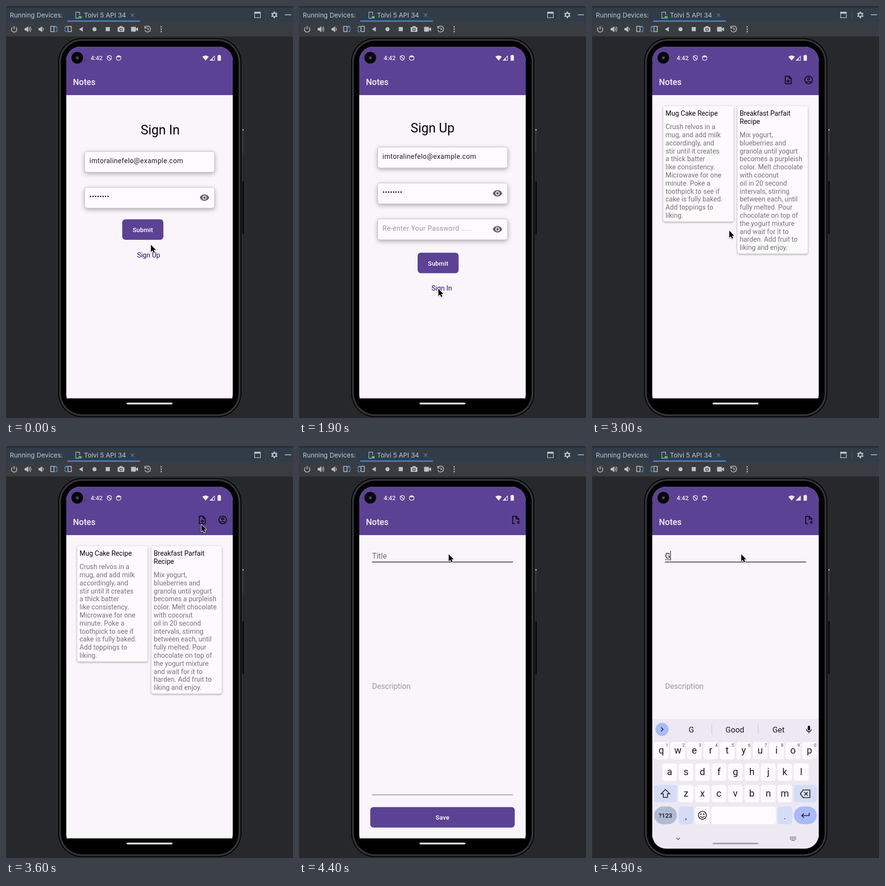
These frames come from a looping animation (600 px wide and 860 px high, 5000 ms). An HTML page with a canvas:

```html
<!DOCTYPE html>
<html lang="en">
<head>
<meta charset="utf-8">
<title>Notes app demo</title>
<style>
html, body { margin: 0; width: 100%; height: 100%; overflow: hidden; background: #27282b; }
canvas { display: block; width: 600px; height: 860px; }
</style>
</head>
<body>
<canvas id="stage"></canvas>
<script>
const LOOP = 5000, STEP = 100;
const canvas = document.getElementById('stage');
const dpr = window.devicePixelRatio || 1;
canvas.width = 600 * dpr;
canvas.height = 860 * dpr;
const ctx = canvas.getContext('2d');

const PURPLE = '#5b4295', PAGE = '#faf5fa', INK = '#1c1b1f', ICON = '#bfc1c4', BLUE = '#4a9bd8';
const SP = 0.8855;          // phone units to pixels
const BODY = 16 * SP, HEADING = 27;

// ---- helpers ----
function rect(x, y, w, h, color) {
  ctx.fillStyle = color;
  ctx.fillRect(x, y, w, h);
}

function box(x, y, w, h, r, fill, stroke) {
  ctx.beginPath();
  ctx.roundRect(x, y, w, h, r);
  if (fill) { ctx.fillStyle = fill; ctx.fill(); }
  if (stroke) { ctx.strokeStyle = stroke; ctx.lineWidth = 1; ctx.stroke(); }
}

function dot(x, y, r, color) {
  ctx.beginPath();
  ctx.arc(x, y, r, 0, Math.PI * 2);
  ctx.fillStyle = color;
  ctx.fill();
}

function ring(x, y, r, color, width) {
  ctx.beginPath();
  ctx.arc(x, y, r, 0, Math.PI * 2);
  ctx.strokeStyle = color;
  ctx.lineWidth = width;
  ctx.stroke();
}

function line(d, color, width) {
  ctx.strokeStyle = color;
  ctx.lineWidth = width;
  ctx.stroke(new Path2D(d));
}

function shape(d, color) {
  ctx.fillStyle = color;
  ctx.fill(new Path2D(d), 'evenodd');
}

// Icon on a 24-unit grid, centred on (x, y)
function icon(d, x, y, color, size = 24 * SP) {
  ctx.save();
  ctx.translate(x - size / 2, y - size / 2);
  ctx.scale(size / 24, size / 24);
  shape(d, color);
  ctx.restore();
}

function text(s, x, y, size, color, { weight = 400, align = 'left', gap = 0, face = 'Roboto' } = {}) {
  ctx.font = `${weight} ${size}px ${face}, sans-serif`;
  ctx.textAlign = align;
  ctx.letterSpacing = gap + 'px';
  ctx.fillStyle = color;
  ctx.fillText(s, x, y);
}

function withShadow(color, blur, dy, draw) {
  ctx.save();
  ctx.shadowColor = color;
  ctx.shadowBlur = blur * dpr;
  ctx.shadowOffsetY = dy * dpr;
  draw();
  ctx.restore();
}

const EYE = 'M12 4.5C7 4.5 2.73 7.61 1 12c1.73 4.39 6 7.5 11 7.5s9.27-3.11 11-7.5c-1.73-4.39-6-7.5-11-7.5zM12 17c-2.76 0-5-2.24-5-5s2.24-5 5-5 5 2.24 5 5-2.24 5-5 5zm0-8c-1.66 0-3 1.34-3 3s1.34 3 3 3 3-1.34 3-3-1.34-3-3-3z';
const NOTE_ADD = 'M13 11h-2v3H8v2h3v3h2v-3h3v-2h-3zm1-9H6c-1.1 0-2 .9-2 2v16c0 1.1.89 2 1.99 2H18c1.1 0 2-.9 2-2V8l-6-6zm4 18H6V4h7v5h5v11z';
const ACCOUNT = 'M12 2C6.48 2 2 6.48 2 12s4.48 10 10 10 10-4.48 10-10S17.52 2 12 2zM7.35 18.5C8.66 17.56 10.26 17 12 17s3.34.56 4.65 1.5C15.34 19.44 13.74 20 12 20s-3.34-.56-4.65-1.5zm10.79-1.38C16.45 15.8 14.32 15 12 15s-4.45.8-6.14 2.12C4.7 15.73 4 13.95 4 12c0-4.42 3.58-8 8-8s8 3.58 8 8c0 1.95-.7 3.73-1.86 5.12zM12 6c-1.93 0-3.5 1.57-3.5 3.5S10.07 13 12 13s3.5-1.57 3.5-3.5S13.93 6 12 6zm0 5c-.83 0-1.5-.67-1.5-1.5S11.17 8 12 8s1.5.67 1.5 1.5S12.83 11 12 11z';
const MIC = 'M12 14c1.66 0 3-1.34 3-3V5c0-1.66-1.34-3-3-3S9 3.34 9 5v6c0 1.66 1.34 3 3 3zM17 11c0 2.76-2.24 5-5 5s-5-2.24-5-5H5c0 3.53 2.61 6.43 6 6.92V21h2v-3.08c3.39-.49 6-3.39 6-6.92h-2z';

// ---- IDE window ----
function speaker(x) {
  shape(`M${x} 46h3l4.500-4v13l-4.500-4h-3z`, ICON);
  line(`M${x + 9} 45.500q2.500 3 0 6`, ICON, 1.4);
}

function rotateIcon(x, side) {
  ctx.save();
  ctx.translate(x, 48);
  ctx.scale(side, 1);
  line('M-6.500 -5.500h7v11h-7z', ICON, 1.6);
  line('M3 -5.500q5 .5 3.500 5.500M3 6q4 0 4 -5M5 -7l-2.500 1.700l2.500 2', BLUE, 1.5);
  ctx.restore();
}

function ide() {
  rect(0, 0, 600, 860, '#27282b');
  rect(0, 0, 600, 4, '#2b2d30');
  rect(0, 4, 600, 29, '#323c48');
  rect(0, 33, 600, 31, '#393d42');
  rect(0, 63, 600, 1, '#313335');
  rect(0, 33, 1, 827, '#303236');

  text('Running Devices:', 8, 23.5, 13.5, '#c3c8ce', { face: 'Inter' });
  text('Tolvi 5 API 34', 163, 23.5, 13.5, '#c3c8ce', { face: 'Inter' });
  rect(128, 30, 152, 3, '#3f7fc6');
  line('M152 25.500h-6v-12.500h8v6', '#aeb3b8', 1.3);
  rect(152, 21, 6, 5, '#5fb865');
  line('M261 15.500l7 7M268 15.500l-7 7', '#727a83', 1.1);

  line('M519.700 12.700h12v11.600h-12z', ICON, 1.3);
  rect(519, 12, 13, 4, ICON);
  rect(543, 8, 1, 21, '#46505b');
  ring(561, 18.5, 3.8, ICON, 2.4);
  for (let i = 0; i < 6; i++) {
    const a = i * Math.PI / 3 + Math.PI / 6, c = Math.cos(a), s = Math.sin(a);
    line(`M${561 + c * 4.5} ${18.5 + s * 4.5}L${561 + c * 6.8} ${18.5 + s * 6.8}`, ICON, 3);
  }
  rect(583, 17.5, 13, 1.6, ICON);

  line('M13.500 44.500a5.600 5.600 0 1 0 7 0M17 42v6.500', ICON, 1.6);
  speaker(39);
  line('M50 43q4.500 5.500 0 11', ICON, 1.4);
  speaker(68);
  rotateIcon(100, 1);
  rotateIcon(130, -1);
  shape('M152.500 48.500l8-5v10z', ICON);
  dot(185, 48.5, 4.3, ICON);
  rect(208.5, 44, 8.5, 8.5, ICON);
  box(233.5, 44, 14, 10, 1.5, ICON);
  rect(237.5, 42, 6, 3, ICON);
  ring(240.5, 49, 2.6, '#393d42', 1.4);
  box(261.5, 43.5, 10, 10, 1, ICON);
  shape('M271 48l5-4v9l-5-4z', ICON);
  line('M291 44.500a6.200 6.200 0 1 1 -.8 5.500M290 42v4h4M296.500 45v3.800h3', ICON, 1.5);
  for (const y of [43.5, 48.5, 53.5]) dot(324.5, y, 1.5, ICON);
}

// ---- phone shell ----
function shell() {
  box(493, 258, 3.5, 49, 1, '#38393b');
  rect(494.5, 257, 2, 3, '#d8d8d8');
  box(493, 366, 4, 110, 1, '#050506');
  const layers = [[0, '#343537'], [1.2, '#0c0c0e'], [4, '#29292c'], [5.2, '#424346'], [6.6, '#232325'], [8, '#000']];
  for (const [d, color] of layers) {
    box(107 + d, 65 + d, 387 - 2 * d, 795 - 2 * d, 52 - d, color);
  }
}

function statusBar(online) {
  const c = '#f1ebf7';
  dot(149, 108, 12.2, '#050507');
  dot(149, 108, 4.5, '#15171d');
  dot(149, 108, 2.6, '#343c52');
  dot(150, 108.5, 1, '#9aa3b5');
  text('4:42', 177, 113, 12.6, c, { weight: 500 });
  line('M216 103.200l4.300 1.700v3.600q0 3.600 -4.300 5.200q-4.300 -1.600 -4.300 -5.200v-3.600zM212.500 104.500l7 7.500', c, 1.3);
  ring(235.5, 108.5, 4.9, c, 1.3);
  shape('M231 107a4.800 4.800 0 0 1 9 0z', c);
  shape('M410.500 105.800q6.800 -5 13.600 0l-6.800 8.200z', c);
  if (online) {
    shape('M425.500 114l11-11v11z', c);
  } else {
    line('M427 113.400l8.900-8.900v8.900z', c, 1.2);
    shape('M426 114l6-6v6z', c);
  }
  rect(444, 102, 3.5, 2, c);
  box(442.3, 103, 7, 11.2, 1, c);
}

function appBar(online) {
  rect(126, 85, 348, 101, PURPLE);
  statusBar(online);
  text('Notes', 140, 165, 20 * SP, '#f7f2fb', { weight: 500 });
}

// ---- pages ----
function field(y, label, { hint = false, eye = false } = {}) {
  withShadow('rgba(60,50,70,.42)', 10, 3, () => box(164.5, y + .5, 271.5, 43.5, 5, '#fdfbfe'));
  box(164.5, y + .5, 271.5, 43.5, 5, '#fdfbfe', '#c6c1ca');
  text(label, 174.5, y + 25.3, BODY, hint ? '#9b979f' : INK, { gap: .443 });
  if (eye) icon(EYE, 415, y + 22, '#625e66');
}

function button(x, y, w, label) {
  box(x, y, w, 42.7, 6.5, PURPLE);
  text(label, x + w / 2, y + 26.6, 13.2, '#fff', { weight: 500, align: 'center', gap: .1 });
}

const MAIL = 'imtoralinefelo@example.com', SECRET = '•'.repeat(8);

function signIn() {
  text('Sign In', 281.5, 268, HEADING, '#050505');
  field(303, MAIL);
  field(378, SECRET, { eye: true });
  button(243, 445.3, 86, 'Submit');
  text('Sign Up', 274, 524.5, BODY, '#1a1168');
}

function signUp() {
  text('Sign Up', 233.2, 264.3, HEADING, '#050505');
  field(294, MAIL);
  field(369, SECRET, { eye: true });
  field(444, 'Re-enter Your Password .....', { hint: true, eye: true });
  button(248, 515, 85.7, 'Submit');
  text('Sign In', 277, 594.3, BODY, '#1a1168');
}

const RECIPES = [
  { x: 149, h: 241, title: ['Mug Cake Recipe'], body: [
    'Crush relvos in a', 'mug, and add milk', 'accordingly, and', 'stir until it creates',
    'a thick batter', 'like consistency.', 'Microwave for one', 'minute. Poke a',
    'toothpick to see if', 'cake is fully baked.', 'Add toppings to', 'liking.'] },
  { x: 304, h: 308, title: ['Breakfast Parfait', 'Recipe'], body: [
    'Mix yogurt,', 'blueberries and', 'granola until yogurt', 'becomes a purpleish',
    'color. Melt chocolate', 'with coconut', 'oil in 20 second', 'intervals, stirring',
    'between each, until', 'fully melted. Pour', 'chocolate on top of', 'the yogurt mixture',
    'and wait for it to', 'harden. Add fruit to', 'liking and enjoy.'] }
];

function noteList() {
  icon(NOTE_ADD, 410.3, 154.3, '#0b0810');
  icon(ACCOUNT, 453, 154.3, '#0b0810');
  for (const { x, h, title, body } of RECIPES) {
    withShadow('rgba(50,40,60,.42)', 4, 1.5, () => box(x, 209, 147, h, 4, '#fdfafd'));
    let y = 229;
    for (const s of title) { text(s, x + 4.8, y, BODY, '#080808'); y += 16.8; }
    y += 11.4;
    for (const s of body) { text(s, x + 4.8, y, BODY, '#767377'); y += 16.8; }
  }
}

function editor(t) {
  line('M451 162.200h-4.200v-15.400h7.700l5 5v4.200M454 147v5.300h5.300', '#0b0810', 1.8);
  line('M456 157l5 5M461 157l-5 5', '#0b0810', 1.5);
  const typed = t >= 4900;
  if (typed) {
    text('G', 152.7, 235.3, 18 * SP, INK);
    rect(153, 237, 11, 1, INK);
  } else {
    text('Title', 152.7, 235.3, 18 * SP, '#6c686f');
  }
  if (t >= 4500) rect(typed ? 163.6 : 153, 219, 1.2, 20, INK);
  rect(152.5, 241.3, 295, 1.8, '#4a474d');
  text('Description', 152.7, 507.4, 18 * SP, '#9b979e');
  rect(152.5, 727.5, 295, 1.2, '#7b777e');
  button(149, 753.7, 302, 'Save');
  if (t > 4500) keyboard(Math.min(1, (t - 4500) / 200), typed);
}

// ---- keyboard ----
const KEY = '#fdfbff', KEY_ALT = '#d4dcf6', ACCENT = '#a8bafa', PITCH = 34.4;

function keyRow(letters, x, y, caps, hints) {
  [...letters].forEach((ch, i) => {
    const cx = x + i * PITCH;
    box(cx - 15.3, y, 30.6, 36, 5, KEY);
    text(caps ? ch.toUpperCase() : ch, cx, y + 24.3, 20, INK, { align: 'center' });
    if (hints) text((i + 1) % 10, cx + 11.8, y + 10, 9, '#45434a', { align: 'center' });
  });
}

function keyboard(p, typed) {
  ctx.save();
  ctx.translate(0, (1 - p) * 270);
  rect(126, 570, 348, 271, '#ece9f2');

  dot(146.3, 591.5, 13.7, ACCENT);
  line('M144.500 587.500l4 4l-4 4', INK, 1.7);
  if (typed) {
    [['G', 207.5], ['Good', 298.7], ['Get', 390]].forEach(([s, x]) =>
      text(s, x, 597.7, 16.5, INK, { align: 'center' }));
    rect(250, 581, 1, 21, '#c8c6cf');
    rect(347, 581, 1, 21, '#c8c6cf');
  }
  icon(MIC, 453.5, 592, INK, 20);

  keyRow('qwertyuiop', 145, 618, !typed, true);
  keyRow('asdfghjkl', 162.2, 662.7, !typed);
  keyRow('zxcvbnm', 196.5, 707.5, !typed);

  box(130, 707.5, 47.5, 36, 5, KEY_ALT);
  const arrow = 'M153.500 717l9 9h-4.700v7.500h-8.600v-7.500h-4.700z';
  if (!typed) shape(arrow, INK);
  line(arrow, INK, 1.6);
  box(422, 707.5, 48, 36, 5, KEY_ALT);
  line('M441.500 718h14v16h-14l-6-8zM444 722.500l7 7M451 722.500l-7 7', INK, 1.7);

  box(130, 752.5, 47.5, 37, 18.5, '#b1bad3');
  text('?123', 153.5, 775.7, 13, INK, { weight: 500, align: 'center' });
  box(181.3, 752.5, 30.5, 37, 5, KEY_ALT);
  text(',', 196.5, 779, 17, INK, { align: 'center' });
  box(215.6, 752.5, 30.5, 37, 5, KEY);
  ring(230.8, 770.8, 8.3, INK, 1.7);
  dot(227.8, 768.3, 1.4, INK);
  dot(233.8, 768.3, 1.4, INK);
  line('M226.300 772.800q4.500 5 9 0', INK, 1.7);
  box(249.8, 752.5, 134.3, 37, 5, KEY);
  box(387.8, 752.5, 30.5, 37, 5, KEY_ALT);
  text('.', 403, 779, 17, INK, { align: 'center' });
  box(422, 752.5, 48, 37, 18.5, ACCENT);
  line('M454 766v5.500h-15M443 767l-4.500 4.500l4.500 4.500', INK, 1.7);

  line('M176 817.500l4 4l4-4', '#58565d', 1.4);
  for (let r = 0; r < 3; r++) {
    for (let c = 0; c < 5; c++) rect(414 + c * 2.7, 815 + r * 2.6, 1.6, 1.5, '#58565d');
  }
  rect(417, 822.8, 7, 1.2, '#58565d');
  box(252, 828, 96, 3.6, 1.8, '#a6a4ab');
  ctx.restore();
}

// ---- pointer ----
const TRAIL = [
  [0, 303, 498.5], [500, 300, 530], [1000, 295, 519], [1200, 295, 519], [1700, 291.5, 590.5],
  [2000, 291.5, 590.5], [2600, 287, 469], [3000, 287, 469], [3500, 408.5, 164],
  [3900, 408.5, 164], [4400, 313, 226], [4900, 312, 226], [5000, 312, 226]
];

function pointer(t) {
  const i = TRAIL.findIndex(k => k[0] > t);
  const [t0, x0, y0] = TRAIL[i - 1], [t1, x1, y1] = TRAIL[i];
  const u = (t - t0) / (t1 - t0), e = u * u * (3 - 2 * u);
  ctx.save();
  ctx.translate(x0 + (x1 - x0) * e, y0 + (y1 - y0) * e);
  ctx.scale(.9, .9);
  const p = 'M0 0v16.300l3.700-3.500l2.500 5.900l2.700-1.100l-2.500-5.800h5.100z';
  ctx.lineJoin = 'round';
  withShadow('rgba(0,0,0,.3)', 3, 1, () => line(p, '#fff', 2));
  shape(p, '#000');
  ctx.restore();
}

// ---- timeline ----
const PAGES = [[1200, signIn], [2100, signUp], [2900, signIn], [4000, noteList], [LOOP, editor]];

function draw(t) {
  ctx.setTransform(dpr, 0, 0, dpr, 0, 0);
  ide();
  shell();
  ctx.save();
  ctx.beginPath();
  ctx.roundRect(126, 85, 348, 755.5, 29);
  ctx.clip();
  rect(126, 85, 348, 735, PAGE);
  rect(126, 819, 348, 22, '#000');
  box(252, 828, 96, 3.6, 1.8, '#fff');
  appBar(t >= 4700);
  PAGES.find(([end]) => t < end)[1](t);
  ctx.restore();
  pointer(t);
}

const start = performance.now();
function tick() {
  const t = (performance.now() - start) % LOOP;
  draw(Math.floor(t / STEP) * STEP);
  requestAnimationFrame(tick);
}
tick();
</script>
</body>
</html>
```
